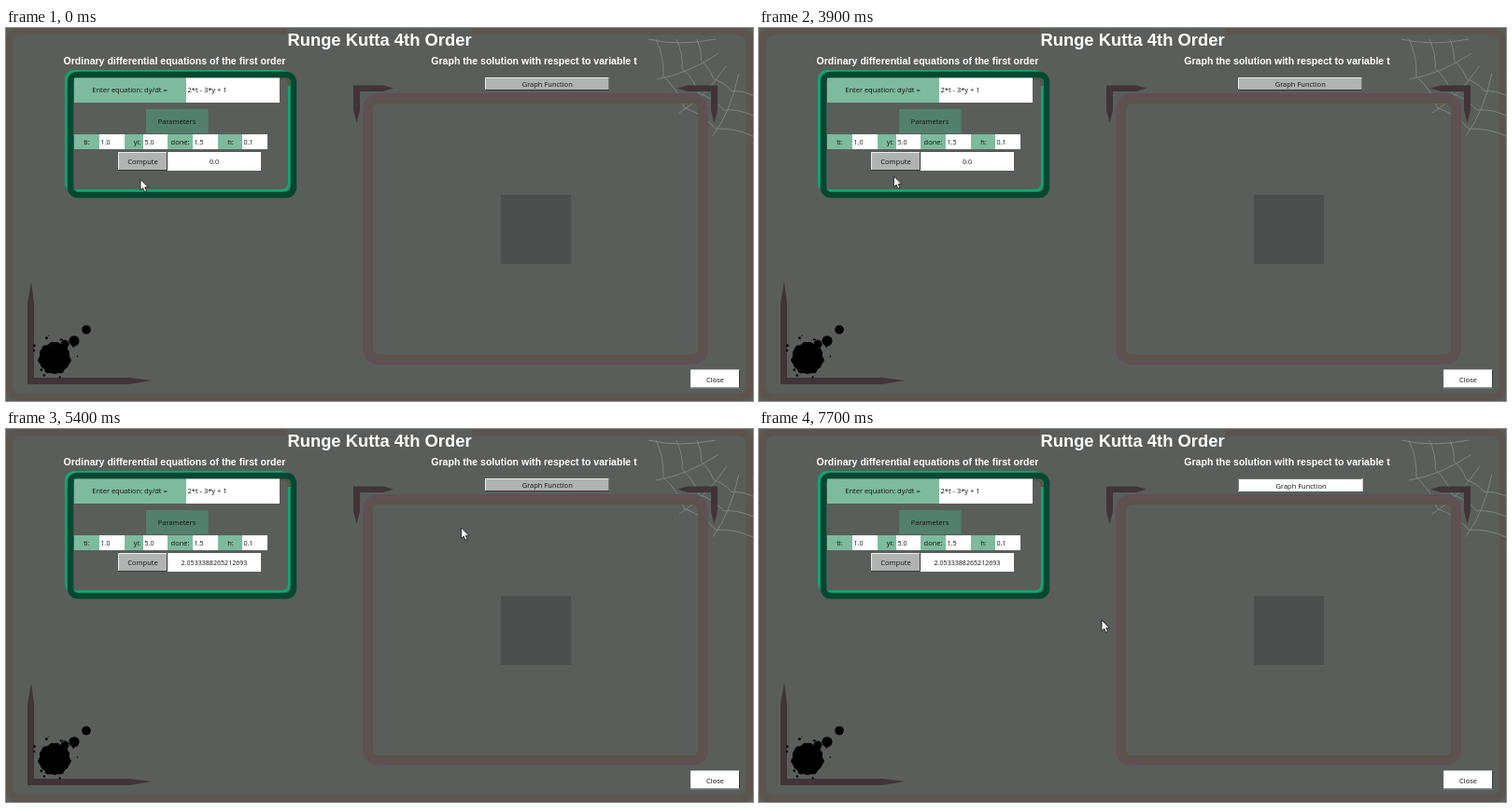
An HTML page that plays this animation: 800 by 400 pixels, repeating every 8 s.

```html
<!DOCTYPE html>
<html lang="en">
<head>
<meta charset="utf-8">
<title>Runge Kutta 4th Order</title>
<style>
html, body { margin: 0; width: 100%; height: 100%; overflow: hidden; background: #595e5a; }
svg { display: block; width: 100vw; height: 100vh; }
text { font-family: "Open Sans", "Noto Sans", sans-serif; font-size: 7.5px; fill: #111; text-anchor: middle; }
.head { font: bold 10.55px "Liberation Sans", Arial, sans-serif; fill: #fff; }
.title { font-size: 18.4px; }
.left { text-anchor: start; }
.num { font-size: 7.1px; }
.line { fill: none; }
</style>
</head>
<body>
<svg viewBox="0 0 800 400">
  <rect width="800" height="400" fill="#595e5a"/>
  <rect class="line" x="3" y="3" width="794" height="394" rx="13" stroke="#5c554f" stroke-width="9"/>
  <rect x="301" width="198" height="8" fill="#595e5a"/>

  <g id="web" class="line" stroke="#7e837f"></g>

  <g class="line" stroke-width="6">
    <rect x="385" y="73" width="364" height="285" rx="14" stroke="#5f5055"/>
    <rect x="390" y="78" width="354" height="275" rx="9" stroke="#5b524c"/>
  </g>
  <g fill="#403439">
    <path id="hook" d="M372 61.500H404L415 64.500L404 68H379V88L375.500 102L372 88Z"/>
    <use href="#hook" transform="matrix(-1 0 0 1 1134 0)"/>
    <path d="M27 272L30 295V375H132L156 378L132 382H23V295Z"/>
  </g>
  <rect x="530" y="179" width="75" height="74" fill="#4b4e4d"/>

  <g id="ink"></g>

  <g class="line">
    <rect x="64.500" y="46.500" width="239" height="128" rx="8" stroke="#0da873" stroke-width="3"/>
    <path d="M294 54H299Q303 54 303 62" stroke="#5a514b" stroke-width="3"/>
    <rect x="69" y="50" width="239" height="129" rx="8" stroke="#054832" stroke-width="6.500"/>
  </g>

  <g id="form"></g>
  <text class="head title" x="400" y="19">Runge Kutta 4th Order</text>
  <text class="head" x="180.500" y="38.500">Ordinary differential equations of the first order</text>
  <text class="head" x="565.500" y="38.500">Graph the solution with respect to variable t</text>
  <path id="cursor" d="M0 0V11.500L2.700 9L4.500 13.200L6.500 12.300L4.700 8.300H8.300Z" fill="#fff" stroke="#111" stroke-width=".8"/>
</svg>
<script>
const NS = "http://www.w3.org/2000/svg";
const $ = id => document.getElementById(id);

function add(parent, tag, attrs, content) {
  const el = document.createElementNS(NS, tag);
  for (const key in attrs) el.setAttribute(key, attrs[key]);
  if (content) el.textContent = content;
  return parent.appendChild(el);
}

const form = $("form");
const box = (x, y, width, height, fill, parent = form) =>
  add(parent, "rect", { x, y, width, height, fill });
const label = (x, y, content, cls = "", parent = form) =>
  add(parent, "text", { x, y, class: cls }, content);

// Raised button; returns a setter for its pressed state
function button(x, y, w, h, content, idle = "#b0b3b1") {
  const g = add(form, "g", {});
  const face = box(x, y, w, h, "", g);
  const light = add(g, "path", { d: `M${x + .5} ${y + h}V${y + .5}H${x + w}`, class: "line" });
  const dark = add(g, "path", { d: `M${x} ${y + h - .5}H${x + w - .5}V${y}`, class: "line" });
  const text = label(x + w / 2, y + h / 2 + 3, content, "", g);
  const set = pressed => {
    face.setAttribute("fill", pressed ? "#fff" : idle);
    light.setAttribute("stroke", pressed ? "#777" : "#eee");
    dark.setAttribute("stroke", pressed ? "#eee" : "#383838");
    text.setAttribute("transform", pressed ? "translate(.8 .7)" : "");
  };
  set(false);
  return set;
}

const GREEN = "#7dba9e";
box(73, 53.5, 120, 26.5, GREEN);
box(193, 53.5, 100, 26.5, "#fff");
label(132.5, 69, "Enter equation: dy/dt =");
label(194.5, 69, "2*t - 3*y + 1", "left");
box(150, 87, 66.5, 26, "#52806c");
label(183, 102.8, "Parameters");

function field(name, value, x, entryX) {
  box(x, 114, 27, 16, GREEN);
  box(entryX, 114, 27, 16, "#fff");
  label(x + 13.5, 124.5, name);
  label(entryX + 1.5, 124.5, value, "left num");
}
field("ti:", "1.0", 73, 100);
field("yi:", "5.0", 127, 147);
field("done:", "1.5", 173, 200);
field("h:", "0.1", 227, 253);

box(173, 133, 100, 20, "#fff");
const result = label(223, 146, "0.0", "num");
const setCompute = button(120, 133, 53, 20, "Compute");
const setGraph = button(513, 53, 133.5, 14, "Graph Function");
button(733, 366.5, 53, 20, "Close", "#fff");

// Cobweb: spokes from the corner, with threads sagging between them
const polar = (cx, cy, r, a) => `${(cx + r * Math.cos(a)).toFixed(1)} ${(cy + r * Math.sin(a)).toFixed(1)}`;
const webPoint = (r, k) => polar(800, 12, r, Math.PI * (1 - k / 8));
let web = "";
for (let k = 0; k < 5; k++) {
  web += `M${webPoint(40, k)}Q${webPoint(80, k + .25)} ${webPoint(112, k)}`;
  for (const r of [60, 82, 104]) if (k < 4) web += `M${webPoint(r, k)}Q${webPoint(r * .93, k + .5)} ${webPoint(r, k + 1)}`;
}
add($("web"), "path", { d: web });

// Ink splash: a lumpy blob, a trail of shrinking drops and scattered specks
let seed = 7;
const random = () => (seed = seed * 16807 % 2147483647) / 2147483647;
const ink = $("ink");
const drop = (cx, cy, r) => add(ink, "circle", { cx, cy, r });
const rim = Array.from({ length: 72 }, (_, i) => {
  const a = i * Math.PI / 36;
  return polar(52, 354, 17 + .6 * Math.sin(7 * a) + .5 * Math.sin(13 * a), a);
});
add(ink, "path", { d: `M${rim.join("L")}Z` });
drop(63, 339, 4.5);
drop(73, 335.5, 5.5);
drop(86, 323.5, 4.8);
for (let i = 0; i < 12; i++) {
  const a = random() * 2 * Math.PI, r = 18 + random() * 7;
  drop(52 + r * Math.cos(a), 352 + r * Math.sin(a), .5 + random());
}

// Pointer moves: start, end, destination
const moves = [
  [1900, 2000, 143, 162.5], [3800, 4300, 150, 145],
  [4800, 5400, 487.5, 106], [5400, 6100, 536, 59],
  [6700, 7000, 520, 115], [7100, 7200, 448, 163], [7400, 7700, 367, 205]
];

function pointer(t) {
  return moves.reduce(([x, y], [from, to, toX, toY]) => {
    const k = Math.min(1, Math.max(0, (t - from) / (to - from)));
    return [x + (toX - x) * k, y + (toY - y) * k];
  }, [144, 162.5]);
}

function draw(ms) {
  const t = Math.floor(ms % 8000 / 100) * 100;
  setCompute(t >= 4500 && t < 4600);
  setGraph(t >= 6300);
  result.textContent = t >= 4600 ? "2.0533388265212693" : "0.0";
  $("cursor").setAttribute("transform", `translate(${pointer(t)})`);
}

const start = performance.now();
function tick() {
  draw(performance.now() - start);
  requestAnimationFrame(tick);
}
tick();
</script>
</body>
</html>
```
